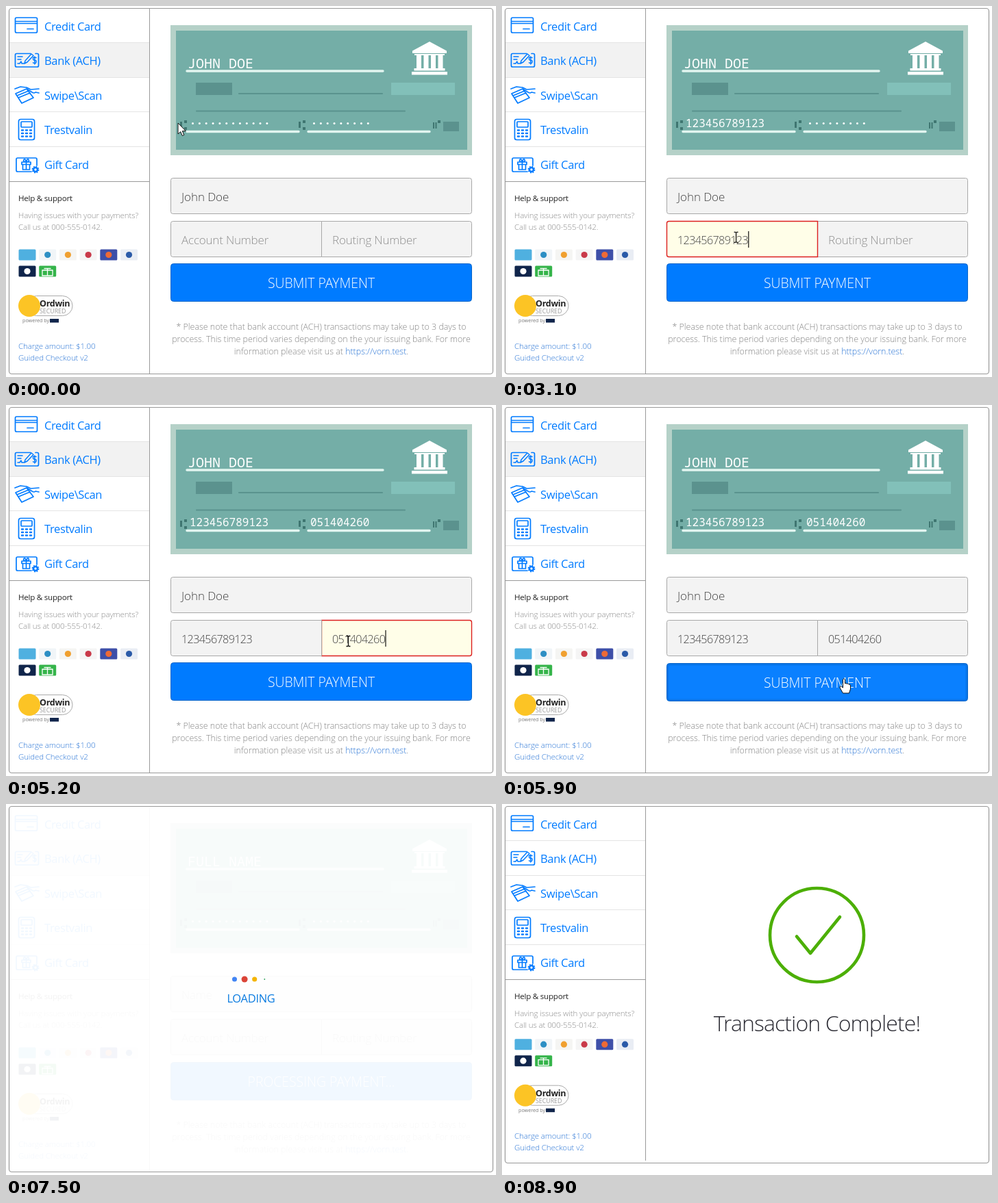
Write an HTML page that moves like this. It is 715x542 px and loops after 9000 ms.

```html
<!DOCTYPE html>
<html lang="en">
<head>
<meta charset="utf-8">
<title>Bank payment form</title>
<style>
  html, body { margin: 0; width: 100%; height: 100%; overflow: hidden; background: #fff; }
  svg { display: block; width: 715px; height: 542px; }
  text { font-family: "Open Sans", "Noto Sans", sans-serif; white-space: pre; }
  .nav text { font-size: 16.5px; letter-spacing: -.36px; fill: #007bff; }
  .icon { fill: none; stroke: #007bff; stroke-width: 1.7; stroke-linejoin: round; stroke-linecap: round; }
  .solid { fill: #007bff; stroke: none; }
  .small { font-size: 11.5px; font-weight: 300; letter-spacing: -.12px; fill: #8c8c8c; }
  .link { fill: #2f78d6; }
  .note { font-size: 12.5px; font-weight: 300; letter-spacing: -.04px; fill: #858585; text-anchor: middle; }
  .mono { font-family: "Noto Sans Mono", "DejaVu Sans Mono", monospace; fill: #fff; font-size: 16px; }
  .field { fill: #f3f3f3; stroke: #a8a8a8; }
  .field.focus { fill: #fffee8; stroke: #dc1f1f; stroke-width: 1.4; }
  .value { font-size: 17px; font-weight: 300; letter-spacing: -.1px; fill: #444; }
  .digits { font-size: 16.2px; letter-spacing: -.66px; }
  .value.empty { font-size: 17px; letter-spacing: -.2px; fill: #8f8f8f; }
  .cursor { fill: #fff; stroke: #111; stroke-linejoin: round; }
  .tick { fill: none; stroke: #4caf05; stroke-width: 4.6; stroke-linecap: round; stroke-linejoin: round; stroke-dasharray: 1 2; }
</style>
</head>
<body>
<svg viewBox="0 0 715 542">
  <g class="nav">
    <rect id="active" x="5" y="54" width="204" height="50" fill="#f2f2f2"/>
    <path d="M5 53.5H209M5 104.5H209M5 154.5H209M5 205.5H209" stroke="#e4e4e4"/>
    <path d="M5 256.5H209" stroke="#999"/>
    <text x="56" y="36">Credit Card</text>
    <text x="56" y="86">Bank (ACH)</text>
    <text x="56" y="137">Swipe\Scan</text>
    <text x="56" y="187">Trestvalin</text>
    <text x="56" y="238">Gift Card</text>
    <g class="icon">
      <rect x="13.5" y="17" width="32" height="22" rx="2"/>
      <path d="M14 22.5H45M14 25.5H45M31 33.5H40"/>
      <path d="M36 69.5H15.500Q13.500 69.500 13.500 71.500V87Q13.500 89 15.500 89H45.500Q47.500 89 47.500 87V71.500Q47.500 69.500 45.500 69.500H43"/>
      <path d="M17 74H24M17 78H22M17 84H20L22 81 23 84H27M27 84L28 80 37 70 40 72.500 31 82ZM44 75.500Q39.500 74 39.500 76.800T42 79.200 44 82 39.500 82.800M41.800 74V85" stroke-width="1.5"/>
      <path d="M14 128L30 121 40 134 23 142ZM16 131L33 124M18 134L35 127M13 121L21 118 30 119 36 122 48 121M30 121L38 126Q41 128 43 126L48 127"/>
      <rect x="18.500" y="165.500" width="23" height="30" rx="3"/>
      <rect x="22" y="169" width="16" height="8" rx="1"/>
      <path d="M23 181.500H25M29 181.500H31M35 181.500H37M23 186H25M29 186H31M35 186H37M23 190.500H25M29 190.500H31M35 190.500H37" stroke-width="2.400"/>
      <path d="M37 242H17Q15 242 15 240V224Q15 222 17 222H43Q45 222 45 224V233"/>
      <path d="M23 228H36V231.500H23ZM24.500 231.500V239H34.500V231.500M29.500 228V239M29.500 228Q24 227 26 224.500T29.500 228Q35 227 33 224.500T29.500 228"/>
      <circle cx="43" cy="239" r="3" stroke-width="2.600"/>
      <circle cx="43" cy="239" r="4.600" stroke-width="1.600" stroke-dasharray="1.8 1.8" stroke-linecap="butt"/>
    </g>
  </g>

  <text class="small" x="18" y="285" style="font-size:11.6px;font-weight:400;fill:#222;letter-spacing:-.25px">Help &amp; support</text>
  <text class="small" x="18" y="310">Having issues with your payments?</text>
  <text class="small" x="18" y="327">Call us at 000-555-0142.</text>
  <g id="lower">
    <g id="cards"></g>
    <path d="M53 387H68V395H53ZM60.500 384V395M55.500 384.500H65.500" transform="translate(0 -1)" fill="none" stroke="#fff" stroke-width="1.300"/>
    <rect x="30" y="423.500" width="67" height="29" rx="14.500" fill="#fff" stroke="#aaa"/>
    <circle cx="34" cy="438" r="16" fill="#fcc425"/>
    <text x="49" y="439" style="font-size:12.5px;font-weight:700;letter-spacing:-.3px" fill="#222">Ordwin</text>
    <text x="49" y="449" style="font-size:8.800px" fill="#999">SECURED</text>
    <text x="24" y="462" style="font-size:7.200px" fill="#777">powered by</text>
    <rect x="64" y="457" width="13" height="5.500" fill="#10254b"/>
    <text class="small link" x="18" y="501">Charge amount: $1.00</text>
    <text class="small link" x="18" y="518">Guided Checkout v2</text>
  </g>
  <path id="divider" stroke="#999"/>

  <g id="form">
    <rect x="240" y="28" width="440" height="190" fill="#b5d1c8"/>
    <rect x="248" y="36" width="425" height="174" fill="#74aea7"/>
    <g stroke-linecap="round">
      <path d="M264 95H550M264 183.500H427M441 183.500H618" stroke="#e2f5f0" stroke-width="3.400"/>
      <path d="M340 128H549M278 153.500H582" stroke="#5a938e" stroke-width="2.200"/>
    </g>
    <path d="M277 112h53v18h-53zM638 169h23v14h-23z" fill="#5b928e"/>
    <rect x="562" y="112" width="93" height="18" fill="#82c0b9"/>
    <path d="M254 169h3v9h-3zM260 167h4v4h-4zM260 177h4v4h-4zM427 169h3v9h-3zM433 167h4v4h-4zM433 177h4v4h-4zM623 170h2v9h-2zM626.500 170h2v9h-2zM630 167h4v4h-4z" fill="#3f7671"/>
    <path d="M593 69V65.500L618 52 643 65.500V69ZM596 70h44v2h-44zM599 72h7v19h-7zM609.500 72h7v19h-7zM620 72h7v19h-7zM630.500 72h7v19h-7zM595.500 91h45v3.500h-45zM592 96h52v4.500h-52z" fill="#fff"/>
    <text id="payer" class="mono" x="265" y="91" style="font-size:20px;font-weight:300"></text>
    <g id="accountDots" fill="#fff"></g>
    <g id="routingDots" fill="#fff"></g>
    <text id="accountCheck" class="mono" x="268" y="177"></text>
    <text id="routingCheck" class="mono" x="444" y="177"></text>

    <rect class="field" x="240.500" y="251.500" width="439" height="52" rx="3"/>
    <text id="holder" class="value" x="256" y="285"></text>
    <path id="routingBox" class="field" d="M460.500 314.500H676.500Q679.500 314.500 679.500 317.500V363.500Q679.500 366.500 676.500 366.500H460.500Z"/>
    <path id="accountBox" class="field" d="M460.500 314.500H243.500Q240.500 314.500 240.500 317.500V363.500Q240.500 366.500 243.500 366.500H460.500Z"/>
    <text id="account" class="value" x="256" y="348"></text>
    <text id="routing" class="value" x="476" y="348"></text>
    <path id="caret" stroke="#111" stroke-width="1.200"/>

    <g id="button">
      <rect id="face" x="240.500" y="376.500" width="439" height="55" rx="4" stroke="#0b66c8"/>
      <rect id="shade" x="242" y="378" width="436" height="52" rx="3" fill="none" stroke="#0560c0" stroke-opacity=".35" stroke-width="3"/>
      <text id="submit" x="460" y="411.500" text-anchor="middle" fill="#fff" style="font-size:19.4px;font-weight:300"></text>
    </g>
    <text class="note" x="460" y="473">* Please note that bank account (ACH) transactions may take up to 3 days to</text>
    <text class="note" x="460" y="491">process. This time period varies depending on the your issuing bank. For more</text>
    <text class="note" x="460" y="509">information please visit us at <tspan class="link">https://vorn.test</tspan>.</text>
  </g>

  <g id="done">
    <circle class="tick" cx="459.500" cy="191.500" r="68.500" pathLength="1" transform="rotate(-90 459.5 191.5)"/>
    <path class="tick" d="M430 193.500L450 218 493 165" pathLength="1"/>
    <text id="complete" x="459.500" y="332" text-anchor="middle" fill="#2b2b33" style="font-size:32px;font-weight:300;letter-spacing:-.9px">Transaction Complete!</text>
  </g>

  <rect id="veil" x="5" y="4" width="705.500" height="534" rx="4" fill="#fff"/>
  <g id="loading">
    <g id="dots"></g>
    <text x="357.500" y="290" text-anchor="middle" fill="#0a7be0" style="font-size:16.5px;letter-spacing:-.3px">LOADING</text>
  </g>
  <rect id="frame" x="4.500" y="3.500" width="706" rx="4" fill="none" stroke="#999" stroke-width="1.200"/>

  <g id="cursor">
    <path id="arrow" class="cursor" d="M0 0V16L3.700 12.600 6.300 18.500 8.800 17.400 6.300 11.700H11.300Z"/>
    <path id="beam" class="cursor" d="M-3 -7.500H-1L0 -6.500 1 -7.500H3M0 -6.500V6.500M-3 7.500H-1L0 6.500 1 7.500H3" style="fill:none;stroke-width:1.300"/>
    <path id="hand" class="cursor" d="M-1.500 1Q0 -1.500 1.500 1V7Q3 5.500 4.300 7.500 6 6 7 8.200 9.500 7.500 9.500 10V15L7.500 21H-1.500L-6 13Q-6 10 -3.500 11.500L-1.500 13Z"/>
  </g>
</svg>
<script>
const LOOP = 9000;
const CLICK = 6050, FINISH = 8300;
const ACCOUNT = { text: "123456789123", first: 1250, step: 130, focus: 1000, blur: 3850 };
const ROUTING = { text: "051404260", first: 3950, step: 150, focus: 3850, blur: 5700 };
const PATH = [
  [0, 251, 171], [150, 251, 171], [900, 323, 337], [2950, 323, 337], [3700, 499.5, 345],
  [5300, 499.5, 345], [5700, 499, 373], [5850, 499, 400], [6350, 498, 399], [6850, 498, 399], [7000, 498, 494]
];

const $ = id => document.getElementById(id);
const clamp = v => Math.max(0, Math.min(1, v));
const ramp = (t, from, to) => clamp((t - from) / (to - from));
const show = (el, on) => { el.style.display = on ? "" : "none"; };
const write = (el, text) => { if (el.textContent !== text) el.textContent = text; };

function add(parent, name, attrs) {
  const el = document.createElementNS("http://www.w3.org/2000/svg", name);
  for (const key in attrs) el.setAttribute(key, attrs[key]);
  return parent.appendChild(el);
}

const beads = (id, count, x) => {
  for (let i = 0; i < count; i++) add($(id), "circle", { cx: x + i * 9.85, cy: 171.5, r: 1.5 });
};
beads("accountDots", 12, 272.5);
beads("routingDots", 9, 449.5);

// Card face colour, then the colour of its plain mark.
[["#4fb0e0"], ["#f1f5f8", "#2d8fc4"], ["#f5f5f3", "#f0a030"], ["#f5f5f5", "#c93a4a"],
 ["#3e4fa8", "#ee6a35"], ["#e9edf4", "#2a5aa8"], ["#10254b", "#fff"], ["#35b44a"]
].forEach(([face, mark], i) => {
  const x = 18.5 + (i % 6) * 29.7, y = i < 6 ? 355.5 : 379.5;
  add($("cards"), "rect", { x, y, width: 25, height: 16, rx: 1.5, fill: face });
  if (mark) add($("cards"), "circle", { cx: x + 12.5, cy: y + 8, r: 4.6, fill: mark });
});

const dots = ["#4285f4", "#db4437", "#f4b400", "#2aa35a"].map((fill, i) =>
  add($("dots"), "circle", { cx: 333.5 + i * 14.6, cy: 256, fill }));

function drawField(id, entry, label, t) {
  const typed = t < CLICK ? Math.max(0, Math.min(entry.text.length, Math.floor((t - entry.first) / entry.step) + 1)) : 0;
  const value = entry.text.slice(0, typed), focused = t >= entry.focus && t < entry.blur;
  write($(id), value || label);
  $(id).setAttribute("class", "value " + (typed ? "digits" : "empty"));
  $(id + "Box").classList.toggle("focus", focused);
  write($(id + "Check"), value);
  show($(id + "Dots"), !typed);
  if (focused) {
    const lastKey = typed ? entry.first + (typed - 1) * entry.step : entry.focus;
    const x = +$(id).getAttribute("x") + (typed ? $(id).getComputedTextLength() + .8 : 0);
    $("caret").setAttribute("d", `M${x} 329V353`);
    show($("caret"), (t - lastKey) % 1060 < 530);
  }
  return focused;
}

function cursorAt(t) {
  const i = PATH.findIndex(p => p[0] > t);
  if (i < 0) return PATH[PATH.length - 1].slice(1);
  const a = PATH[i - 1], b = PATH[i], p = ramp(t, a[0], b[0]), k = p * p * (3 - 2 * p);
  return [a[1] + (b[1] - a[1]) * k, a[2] + (b[2] - a[2]) * k];
}

function drawCursor(t) {
  const [x, y] = cursorAt(t), live = t < CLICK;
  const hand = live && y >= 376;
  const beam = live && (y > 251 && y < 304 || y > 314 && y < 367);
  $("cursor").setAttribute("transform", `translate(${x} ${y})`);
  show($("cursor"), t < 7050);
  show($("hand"), hand);
  show($("beam"), beam);
  show($("arrow"), !hand && !beam);
  return hand;
}

function draw(t) {
  const sent = t >= CLICK, done = t >= FINISH;
  write($("payer"), sent ? "FULL NAME" : "JOHN DOE");
  write($("holder"), sent ? "Name" : "John Doe");
  $("holder").classList.toggle("empty", sent);
  write($("submit"), sent ? "PROCESSING PAYMENT..." : "SUBMIT PAYMENT");
  const editing = [
    drawField("account", ACCOUNT, "Account Number", t),
    drawField("routing", ROUTING, "Routing Number", t)
  ];
  if (!editing.includes(true)) show($("caret"), false);

  const hover = drawCursor(t);
  $("face").setAttribute("fill", hover ? "#0a80ff" : "#007bff");
  $("button").setAttribute("transform", `translate(0 ${hover || sent ? 1 : 0})`);
  show($("shade"), hover);

  show($("form"), !done);
  show($("done"), done);
  show($("active"), !done);
  $("lower").setAttribute("transform", `translate(0 ${done ? -12.3 : 0})`);
  $("divider").setAttribute("d", `M209.5 4V${done ? 521 : 538}`);
  $("frame").setAttribute("height", done ? 521 : 534);

  const veil = ramp(t, CLICK, 6300) * (1 - ramp(t, FINISH, 8550));
  $("veil").setAttribute("opacity", veil * .945);
  $("loading").setAttribute("opacity", done ? 0 : veil);
  dots.forEach((dot, i) => {
    const phase = (t - 7500) / 1550 + .68 - i * .18;
    dot.setAttribute("r", 4.5 * Math.min(1, 1.1 * Math.sin(Math.PI * phase) ** 2));
  });

  const strokes = [ramp(t, 8400, 8700), ramp(t, 8650, 8850)];
  document.querySelectorAll(".tick").forEach((el, i) => {
    show(el, strokes[i] > 0);
    el.style.strokeDashoffset = 1 - strokes[i];
  });
  $("complete").setAttribute("opacity", ramp(t, 8400, 8650));
}

const start = performance.now();
function tick() {
  draw((performance.now() - start) % LOOP);
  requestAnimationFrame(tick);
}
tick();
</script>
</body>
</html>
```
